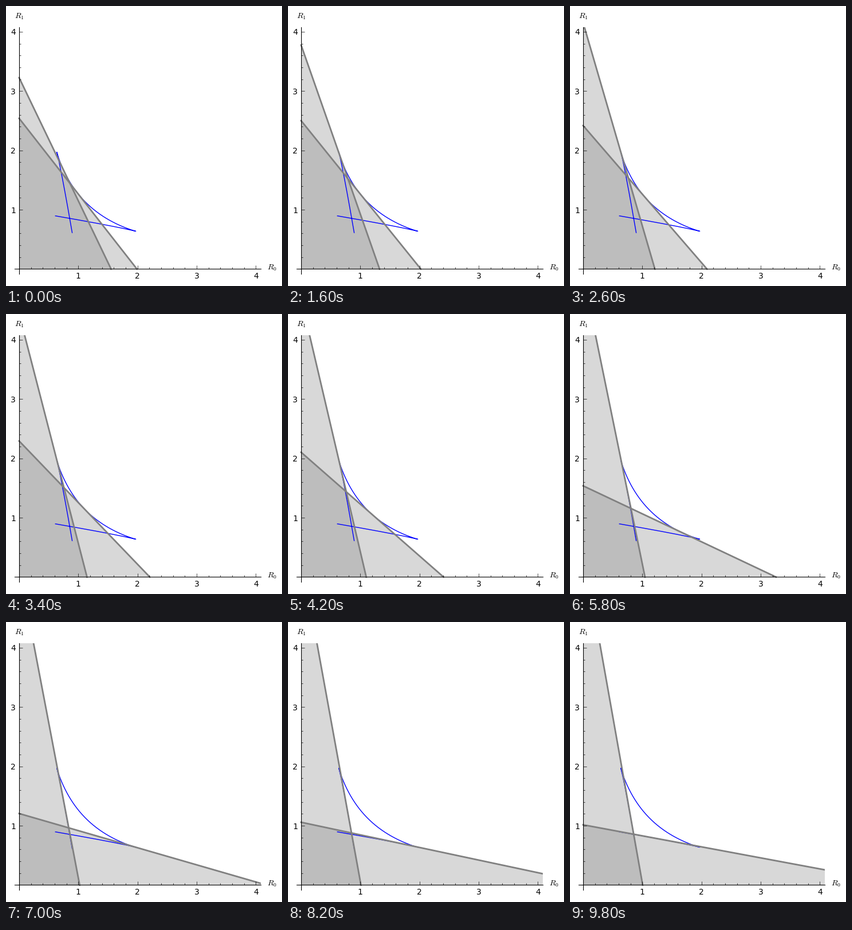
A matplotlib script for the animation above (10000 ms loop, 482x488 px).

```python
import numpy as np
import matplotlib.pyplot as plt
from matplotlib.animation import FuncAnimation
from matplotlib.ticker import MultipleLocator, FixedLocator

W, H, DPI = 482, 488, 100
FRAMES, STEP = 50, 200
LIMITS = (-0.08, 4.08)
LEFT, BOTTOM, SIZE = 14.67, 466.67, 430  # plot area in pixels
K = 1.25  # sharpness of the trade-off between the two uptake rates

plt.rcParams.update({"font.family": "DejaVu Sans", "mathtext.fontset": "cm"})


def uptake(u):
    return 1 / (1 + K * (1 - u) ** 2), 1 / (1 + K * (1 + u) ** 2)


def envelope(u):
    """Curve touched by every line p0*R0 + p1*R1 = 1."""
    p0, p1 = uptake(u)
    d0 = 2 * K * (1 - u) * p0 ** 2
    d1 = -2 * K * (1 + u) * p1 ** 2
    det = p1 * d0 - p0 * d1
    return -d1 / det, d0 / det


def spline(t, y, v_start, v_end, x):
    """Cubic spline with given end slopes."""
    t, y = np.array(t, float), np.array(y)
    h, n = np.diff(t), len(t)
    slope = np.diff(y) / h
    a, b = np.eye(n), np.zeros(n)
    b[0], b[-1] = v_start, v_end
    for i in range(1, n - 1):
        a[i, i - 1:i + 2] = h[i], 2 * (h[i - 1] + h[i]), h[i - 1]
        b[i] = 3 * (h[i] * slope[i - 1] + h[i - 1] * slope[i])
    v = np.linalg.solve(a, b)
    i = np.clip(np.searchsorted(t, x, side="right") - 1, 0, n - 2)
    s = (x - t[i]) / h[i]
    return (y[i] * (1 + 2 * s) * (1 - s) ** 2 + y[i + 1] * s * s * (3 - 2 * s)
            + h[i] * s * (1 - s) * (v[i] * (1 - s) - v[i + 1] * s))


steps = np.arange(FRAMES)
traits = (
    spline([0, 8, 13, 21, 29, 41, 49],
           [0.3345, 0.490, 0.588, 0.717, 0.810, 0.906, 0.930],
           0.0193, 0.0016, steps),
    spline([0, 6, 12, 18, 24, 30, 41, 49],
           [0.110, 0.102, 0.0735, 0.001, -0.1465, -0.3875, -0.784, -0.889],
           -0.0005, -0.0075, steps),
)

fig = plt.figure(figsize=(W / DPI, H / DPI), dpi=DPI, facecolor="white")
ax = fig.add_axes([LEFT / W, 1 - BOTTOM / H, SIZE / W, SIZE / H])
ax.patch.set_visible(False)
ax.set_axisbelow(False)
for side in ("top", "right"):
    ax.spines[side].set_visible(False)
for side in ("left", "bottom"):
    ax.spines[side].set_position("zero")
    ax.spines[side].set_linewidth(0.8)
for axis in (ax.xaxis, ax.yaxis):
    axis.set_major_locator(FixedLocator([1, 2, 3, 4]))
    axis.set_minor_locator(MultipleLocator(0.2))
    axis.set_major_formatter("{x:.0f}")
ax.tick_params(which="major", direction="in", length=4, width=0.5, pad=4.2,
               labelsize=10)
ax.tick_params(which="minor", direction="in", length=2, width=0.5)

fig.text(456 / W, 1 - 460 / H, "$R_0$", fontsize=10, va="baseline")
fig.text(15 / W, 1 - 22 / H, "$R_1$", fontsize=10, va="baseline")

ax.plot(*envelope(np.linspace(-0.96, 0.96, 400)), color="blue", lw=1, zorder=2)
fills = [ax.fill([0, 0, 0], [0, 0, 0], fc="gray", ec="none", alpha=0.3,
                 zorder=1)[0] for _ in traits]
lines = [ax.plot([], [], color="gray", lw=2, solid_capstyle="projecting",
                 zorder=2.1)[0] for _ in traits]
ax.set(xlim=LIMITS, ylim=LIMITS)


def draw(i):
    for trait, fill, line in zip(traits, fills, lines):
        p0, p1 = uptake(trait[i])
        fill.set_xy([(0, 0), (1 / p0, 0), (0, 1 / p1)])
        line.set_data([0, 1 / p0], [1 / p1, 0])
    return fills + lines


anim = FuncAnimation(fig, draw, frames=FRAMES, init_func=lambda: draw(0),
                     interval=STEP, repeat=True, repeat_delay=0)
plt.show()
```
